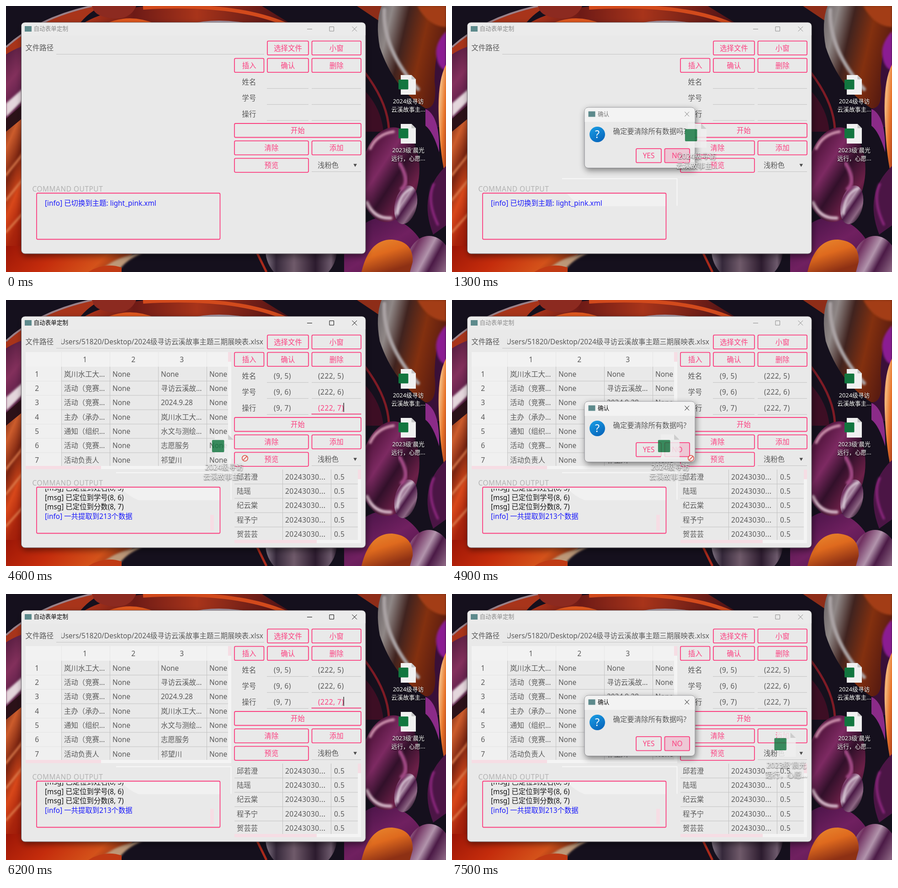
These frames come from a looping animation (963x582 px, 8 s). An HTML page:

```html
<!DOCTYPE html>
<html lang="zh-CN">
<head>
<meta charset="utf-8">
<title>自动表单定制</title>
<style>
html, body { margin: 0; width: 100%; height: 100%; overflow: hidden; background: #15101d; }
svg { display: block; width: 963px; height: 582px; font: 15.4px "Noto Sans", "Noto Sans CJK SC", sans-serif; }
text { fill: #5a5a5a; white-space: pre; }
.mid { text-anchor: middle; }
.num { letter-spacing: .4px; font-size: 15.6px; }
.btn rect { fill: none; stroke: #fb4080; stroke-width: 1.8; }
.btn text { fill: #fb4080; text-anchor: middle; }
.line { stroke: #c3c3c3; fill: none; }
.pink { fill: #f6dde4; }
.track { fill: #f4f4f4; }
.blue { fill: #1b1bfb; }
.black { fill: #161616; }
.icon text { fill: #fff; font-size: 12.8px; text-anchor: middle; filter: drop-shadow(0 1px 1px #000); }
.title { font-size: 12.6px; }
.glow path { fill: none; stroke-linecap: round; filter: url(#soft); }

/* 100 ms = 1.25% */
.title, .ctl, .dtitle, .dctl, .dialog, .ghostA, .ghostB, .hoverA, .hoverB, .data, .empty, .ban, .focus, .blur, .caret, .sheen {
  animation: 8s step-end infinite;
}
.ctl, .dctl { fill: none; stroke: currentColor; }
.title, .dtitle { fill: currentColor; }
.title, .ctl { animation-name: active; }
.dtitle, .dctl { animation-name: dactive; }
.dtitle { font-size: 12.6px; }
.dialog { animation-name: dialog; transform-origin: 411px 288px; }
.ghostA { animation-name: ghostA; }
.ghostB { animation-name: ghostB; }
.hoverA { animation-name: hoverA; }
.hoverB { animation-name: hoverB; }
.data { animation-name: data; }
.empty { animation-name: empty; }
.ban { animation-name: ban; }
.focus { animation-name: focus; }
.blur { animation-name: blur; }
.caret { animation-name: caret; }
.sheen { animation-name: sheen; }

@keyframes active {
  0%, 58.75%, 88.75%, 100% { color: #8b8b8b; }
  23.75%, 76.25% { color: #080808; }
}
@keyframes dactive { 0% { color: #777; } 40%, 100% { color: #080808; } }
@keyframes dialog {
  0%, 25%, 77.5% { opacity: 0; transform: scale(.94); }
  15%, 92.5% { opacity: .5; transform: scale(.96); }
  58.75% { opacity: .35; transform: scale(.94); }
  60% { opacity: .8; transform: scale(.98); }
  16.25%, 61.25%, 93.75%, 100% { opacity: 1; transform: none; }
  22.5%, 75% { opacity: .6; transform: scale(.97); }
  23.75%, 76.25% { opacity: .2; transform: scale(.94); }
}
@keyframes ghostA {
  0% { opacity: 0; transform: translate(880.5px, 151px) scale(1.235); }
  11.25% { opacity: .82; transform: translate(839px, 164px) scale(1.235); }
  12.5% { opacity: .82; transform: translate(726px, 199px) scale(1.235); }
  13.75% { opacity: .82; transform: translate(605px, 236px) scale(1.235); }
  15% { opacity: .82; transform: translate(536.5px, 257px) scale(1.235); }
  57.5% { opacity: .82; transform: translate(477.5px, 294px) scale(1.235); }
  76.25%, 100% { opacity: 0; transform: translate(477.5px, 294px) scale(1.235); }
}
@keyframes ghostB {
  0% { opacity: 0; transform: translate(880.5px, 258px) scale(1.235); }
  88.75% { opacity: .82; transform: translate(858px, 265px) scale(1.235); }
  90% { opacity: .82; transform: translate(788px, 286px) scale(1.235); }
  91.25%, 100% { opacity: .82; transform: translate(732px, 303px) scale(1.235); }
}
@keyframes hoverA { 0%, 12.5%, 100% { opacity: 0; } 8.75% { opacity: 1; } }
@keyframes hoverB { 0%, 90%, 100% { opacity: 0; } 86.25% { opacity: 1; } }
@keyframes data { 0% { opacity: 0; } 57.5%, 100% { opacity: 1; } }
@keyframes empty { 0% { opacity: 1; } 57.5%, 100% { opacity: 0; } }
@keyframes ban { 0%, 76.25%, 100% { opacity: 0; } 57.5% { opacity: 1; } }
@keyframes focus { 0%, 58.75%, 88.75%, 100% { opacity: 0; } 57.5%, 76.25% { opacity: 1; } }
@keyframes blur { 0%, 57.5%, 76.25% { opacity: 0; } 58.75%, 88.75%, 100% { opacity: 1; } }
@keyframes caret { 0%, 58.75%, 82.5%, 100% { opacity: 0; } 57.5%, 76.25% { opacity: 1; } }
@keyframes sheen { 0% { opacity: 0; } 16.25%, 100% { opacity: 1; } }
</style>
</head>
<body>
<svg viewBox="0 0 963 582">
  <defs>
    <linearGradient id="fire" x2="1" y2=".2">
      <stop stop-color="#9c1606"/><stop offset=".4" stop-color="#c42c0c"/><stop offset=".75" stop-color="#d4521a"/><stop offset="1" stop-color="#6a2414"/>
    </linearGradient>
    <linearGradient id="arc" x2="1">
      <stop stop-color="#b8381a"/><stop offset=".25" stop-color="#6d1a16"/><stop offset=".55" stop-color="#a8341a"/><stop offset="1" stop-color="#4b1015"/>
    </linearGradient>
    <linearGradient id="plum" x2=".4" y2="1">
      <stop stop-color="#4a1838"/><stop offset=".45" stop-color="#83305c"/><stop offset=".75" stop-color="#5c1e48"/><stop offset="1" stop-color="#3c1828"/>
    </linearGradient>
    <linearGradient id="side" x2=".3" y2="1">
      <stop stop-color="#6b2412"/><stop offset=".2" stop-color="#cc5c2c"/><stop offset=".4" stop-color="#7c2410"/><stop offset=".6" stop-color="#d8481a"/><stop offset=".8" stop-color="#a8240c"/><stop offset="1" stop-color="#9c1606"/>
    </linearGradient>
    <linearGradient id="steel" x2="1" y2=".35">
      <stop stop-color="#6b6467"/><stop offset=".2" stop-color="#8f8786"/><stop offset=".42" stop-color="#40231f"/><stop offset=".7" stop-color="#83300f"/><stop offset="1" stop-color="#5a1c10"/>
    </linearGradient>
    <linearGradient id="bubble" x2="1" y2=".8">
      <stop stop-color="#b0628c"/><stop offset=".2" stop-color="#561640"/><stop offset=".42" stop-color="#7d2a62"/><stop offset=".62" stop-color="#32102a"/><stop offset=".85" stop-color="#6c2048"/><stop offset="1" stop-color="#3c1230"/>
    </linearGradient>
    <linearGradient id="pearl" x2="1" y2=".7">
      <stop stop-color="#cbb6c6"/><stop offset=".22" stop-color="#703060"/><stop offset=".45" stop-color="#b294ac"/><stop offset=".6" stop-color="#4b1a46"/><stop offset=".85" stop-color="#8d6784"/><stop offset="1" stop-color="#382036"/>
    </linearGradient>
    <linearGradient id="smoke" x2="1">
      <stop stop-color="#857887"/><stop offset=".15" stop-color="#35283a"/><stop offset=".4" stop-color="#6f5a6a"/><stop offset=".7" stop-color="#2c1b2e"/><stop offset=".92" stop-color="#6d5a6c"/><stop offset="1" stop-color="#281a2a"/>
    </linearGradient>
    <linearGradient id="violet" x2="1" y2="1">
      <stop stop-color="#3d1040"/><stop offset=".5" stop-color="#702060"/><stop offset="1" stop-color="#4b1345"/>
    </linearGradient>
    <linearGradient id="egg" x2=".5" y2="1">
      <stop stop-color="#e98a30"/><stop offset=".5" stop-color="#df6a1e"/><stop offset="1" stop-color="#8d3014"/>
    </linearGradient>
    <linearGradient id="amber" y2="1">
      <stop stop-color="#d8561a"/><stop offset=".25" stop-color="#f3b87c"/><stop offset=".6" stop-color="#e8742a"/><stop offset="1" stop-color="#a53a1c"/>
    </linearGradient>
    <linearGradient id="help" x2=".6" y2="1"><stop stop-color="#1ba0e6"/><stop offset="1" stop-color="#0868bd"/></linearGradient>
    <filter id="shadow" x="-20%" y="-20%" width="140%" height="150%"><feDropShadow dy="5" stdDeviation="7" flood-opacity=".45"/></filter>
    <filter id="soft" x="-30%" y="-30%" width="160%" height="160%"><feGaussianBlur stdDeviation="2"/></filter>
    <clipPath id="pathClip"><rect x="121" y="76" width="444" height="30"/></clipPath>
    <clipPath id="gridClip"><rect x="43" y="114" width="443" height="249"/></clipPath>
    <clipPath id="listClip"><rect x="500" y="371" width="270" height="154"/></clipPath>
    <clipPath id="logClip"><rect x="69" y="413" width="398" height="95"/></clipPath>
  </defs>

  <g id="wall">
    <rect width="963" height="582" fill="#15101d"/>
    <path d="M0 92Q70 26 185 0H210Q180 14 160 40L0 130Z" fill="#a8341a"/>
    <path d="M0 90Q70 26 188 0" fill="none" stroke="#9a8088" stroke-width="4"/>
    <path d="M165 40Q240 -6 380 0H560L625 40Z" fill="url(#arc)"/>
    <path d="M300 4Q500 -8 612 40" fill="none" stroke="#d24a1c" stroke-width="8"/>
    <path d="M189 0H285Q270 34 225 26Q190 20 189 0Z" fill="#8c2a20"/>
    <path d="M215 40Q270 14 330 40Z" fill="#e0581e"/>
    <path d="M400 40Q460 24 545 40Z" fill="#a699a8"/>
    <path d="M0 106Q20 92 60 80V250L0 262Z" fill="url(#plum)"/>
    <path d="M0 213L40 178V203L0 243Z" fill="#e4d6dc" filter="url(#soft)"/>
    <path d="M0 247L40 212V250L0 275Z" fill="#2b1118"/>
    <path d="M0 275L45 238V582H0Z" fill="url(#side)"/>
    <g class="glow" stroke="#e08050" stroke-width="4"><path d="M0 370L40 320M0 425L40 375M0 495L40 450"/></g>
    <path d="M0 525H310Q255 550 240 582H0Z" fill="url(#fire)"/>
    <path d="M205 582Q235 548 300 540Q258 557 246 582Z" fill="#bd9878" filter="url(#soft)"/>
    <path d="M180 582Q215 560 253 572V582Z" fill="#c03a14"/>
    <path d="M547 535L570 582" stroke="#a92a1b" stroke-width="5"/>
    <ellipse cx="646" cy="535" rx="78" ry="73" fill="url(#smoke)"/>
    <path d="M768 0H835V45Z" fill="#8e2d18"/>
    <path d="M963 40V265H930Q905 150 880 125Z" fill="#3a1038"/>
    <path d="M822 0H963V60Q938 90 938 165Q945 225 918 224Q848 180 818 90Q808 35 822 0Z" fill="url(#steel)"/>
    <path d="M900 0H963V46Q925 45 900 0Z" fill="#a33d14" filter="url(#soft)"/>
    <path d="M963 55Q935 85 943 115Q948 138 963 140Z" fill="#8b1f92" filter="url(#soft)"/>
    <path d="M963 128Q944 165 947 240Q950 330 963 378Z" fill="url(#amber)"/>
    <path d="M785 145Q838 215 838 275" fill="none" stroke="#7d1b25" stroke-width="5"/>
    <path d="M785 185Q822 225 826 275H785Z" fill="#3d0e24"/>
    <path d="M918 225Q950 240 948 320Q935 275 918 262Z" fill="#8b2b88"/>
    <path d="M963 350Q900 410 935 500L963 480Z" fill="#4b1545"/>
    <path d="M740 582V530Q790 440 860 470Q920 500 930 582Z" fill="url(#violet)"/>
    <ellipse cx="840" cy="369" rx="64" ry="104" transform="rotate(7 840 369)" fill="url(#bubble)"/>
    <ellipse cx="875" cy="435" rx="24" ry="43" transform="rotate(13 875 435)" fill="url(#pearl)"/>
    <ellipse cx="926" cy="568" rx="50" ry="65" fill="url(#pearl)"/>
    <path d="M778 582Q795 510 845 511Q892 515 890 560L884 582Z" fill="url(#egg)"/>
    <g class="glow">
      <path d="M828 8Q824 95 902 182" stroke="#aaa3a4" stroke-width="8"/>
      <path d="M936 390Q920 425 945 478" stroke="#8e2880" stroke-width="5"/>
      <path d="M797 312Q812 280 848 275" stroke="#d094b0" stroke-width="6"/>
      <path d="M790 430Q806 466 842 464" stroke="#d2b4c4" stroke-width="7"/>
      <path d="M857 455Q858 412 888 399" stroke="#e4d8e2" stroke-width="4"/>
      <path d="M862 345Q885 385 866 400" stroke="#a04a84" stroke-width="8"/>
    </g>
  </g>
  <g id="desk"></g>
  <g id="app"></g>
  <g id="top"></g>
</svg>
<script>
const PINK = '#fb4080';
const put = (id, ...parts) => { document.getElementById(id).innerHTML = parts.flat(3).join(''); };
const text = (x, y, s, cls = '') => `<text x="${x}" y="${y}" class="${cls}">${s}</text>`;
const rect = (x, y, w, h, attr = '') => `<rect x="${x}" y="${y}" width="${w}" height="${h}" ${attr}/>`;
const path = (d, cls = 'line', attr = '') => `<path d="${d}" class="${cls}" ${attr}/>`;
const group = (cls, ...parts) => `<g class="${cls}">${parts.flat(3).join('')}</g>`;
const clip = (id, ...parts) => `<g clip-path="url(#${id})">${parts.flat(3).join('')}</g>`;
const button = (x, y, w, s) => group('btn', rect(x, y, w, 30.5, 'rx="2.5"'), text(x + w / 2, y + 20.9, s));
const badge = (x, y) => rect(x, y, 15, 12, 'fill="#5d8a8c"');

const icon = lines => group('icon',
  path('M-16.5 0H7L16.5 9.5V43H-16.5Z', '', 'fill="#f0f0f0"'),
  path('M7 0V9.5H16.5Z', '', 'fill="#c6c6c6"'),
  rect(-21.5, 10, 21.5, 21.5, 'rx="1.5" fill="#12763f"'),
  lines.map((s, i) => text(0, 62 + i * 17.5, s)));
const place = (x, y, s) => `<g transform="translate(${x} ${y})">${s}</g>`;
const hover = (cls, y) => rect(841.5, y, 78, 89, `rx="4" class="${cls}" fill="#fff" fill-opacity=".14" stroke="#fff" stroke-opacity=".18"`);

const fileA = icon(['2024级寻访', '云溪故事主...']);
const fileB = icon(["2023级'晨光", '远行，心愿...']);

put('desk',
  hover('hoverA', 145.5), hover('hoverB', 253.5),
  place(880.5, 151, fileA), place(880.5, 258, fileB));

// Spreadsheet
const ROW = 31.35;
const cells = [
  ['岚川水工大...', 'None', 'None'],
  ['活动（竞赛...', 'None', '寻访云溪故...'],
  ['活动（竞赛...', 'None', '2024.9.28'],
  ['主办（承办...', 'None', '岚川水工大...'],
  ['通知（组织...', 'None', '水文与测绘...'],
  ['活动（竞赛...', 'None', '志愿服务'],
  ['活动负责人', 'None', '祁望川']
];
const sheet = [
  clip('gridClip',
    rect(43, 114, 443, 32, 'fill="#f2f2f2"'), rect(43, 146, 78, 217, 'fill="#f0f0f0"'),
    [1, 2, 3].map(n => text(67 + n * 106, 135.6, n, 'mid num')),
    cells.map((row, r) => {
      const y = 146 + r * ROW;
      return [
        path(`M121 ${y + ROW}H486`), text(68, y + 21.5, r + 1, 'mid num'),
        [...row, 'None'].map((s, c) => text(127 + c * 106, y + 21.5, s))
      ];
    }),
    path('M121.5 146V363M227.5 146V363M333.5 146V363M439.5 146V363'),
    path('M121.5 114V146M227.5 114V146M333.5 114V146M439.5 114V146M43 177.5H121M43 208.5H121M43 240H121M43 271.5H121M43 302.5H121M43 334H121', 'line', 'stroke-opacity=".25"')),
  rect(486, 114, 7, 256, 'class="track"'), rect(43, 363, 443, 7, 'class="track"'),
  rect(486, 114, 7, 21, 'class="pink"'), rect(43, 363, 165, 7, 'class="pink"')
];

// Extracted list
const people = ['邱若澄', '陆瑶', '纪云棠', '程予宁', '贺芸芸'];
const list = [
  clip('listClip',
    people.map((s, i) => {
      const y = 392.6 + i * ROW;
      return [
        text(505, y, s), text(611, y, '20243030...', 'num'), text(718, y, '0.5', 'num'),
        path(`M500 ${y + 10}H770`)
      ];
    }),
    path('M605.5 371V525M711.5 371V525')),
  rect(770, 371, 7, 154, 'class="track"'), rect(500, 525, 277, 7, 'class="track"'),
  rect(770, 371, 7, 21, 'class="pink"'), rect(500, 525, 180, 7, 'class="pink"')
];

const log = clip('logClip',
  ['姓名(8, 5)', '学号(8, 6)', '分数(8, 7)'].map((s, i) => text(85, 417.4 + i * 20.5, '[msg] 已定位到' + s, 'black')),
  text(85, 478.6, '[info] 一共提取到213个数据', 'blue'),
  rect(447, 470, 8, 34, 'class="pink"'));

const fields = ['姓名', '学号', '操行'].map((s, i) => {
  const y = 172.4 + i * 35;
  return [text(516.5, y, s), path(`M571 ${y + 8}H662M669 ${y + 8}H777`)];
});
const values = [5, 6, 7].map((n, i) => {
  const y = 171.8 + i * 35;
  return [
    text(586, y, `(9, ${n})`, 'num'),
    n < 7 ? text(683, y, `(222, ${n})`, 'num') : group('blur', text(683, y, '(222, 7)', 'num'))
  ];
});

put('app',
  rect(33.5, 36, 753.5, 506, 'rx="8" fill="#e9e9e9" stroke="#68646a" filter="url(#shadow)"'),
  path('M34 64V44Q34 36.5 42 36.5H779Q786.5 36.5 786.5 44V64Z', '', 'fill="#ebebeb"'),
  badge(41, 44), text(60.5, 54.4, '自动表单定制', 'title'),
  path('M659 50.5H670M708 45.5H717.5V55H708ZM757.5 45L768 55.5M768 45L757.5 55.5', 'ctl'),
  text(42.5, 97.2, '文件路径'), path('M110 105.5H565'),
  button(572, 76.7, 90, '选择文件'), button(669.5, 76.7, 107.5, '小窗'),
  button(500, 114.7, 64.5, '插入'), button(572, 114.7, 90, '确认'), button(669.5, 114.7, 107.5, '删除'),
  fields,
  button(500, 257, 277, '开始'),
  button(500, 295.2, 162, '清除'), button(669.5, 295.2, 107.5, '添加'),
  button(500, 333.3, 162, '预览'),
  text(682, 353.6, '浅粉色'), path('M760.5 345.5H768L764.2 352Z', '', 'fill="#4a4a4a"'), path('M669 362.5H777'),
  `<text x="57.5" y="405.8" style="fill:#b2b2b2;letter-spacing:.55px">COMMAND OUTPUT</text>`,
  group('sheen',
    path('M241 377.8H492.5V437', '', 'fill="none" stroke="#f8f8f8" stroke-width="2"'),
    path('M252 411H468V438H290Q268 430 252 411Z', '', 'fill="#f1f1f1"')),
  rect(67, 409.5, 401.5, 101, `rx="2.5" fill="none" stroke="${PINK}" stroke-width="1.8"`),
  group('empty', text(85, 436.8, '[info] 已切换到主题: light_pink.xml', 'blue')),
  group('data',
    clip('pathClip', '<text x="563" y="97" text-anchor="end">C:/Users/51820/Desktop/2024级寻访云溪故事主题三期展映表.xlsx</text>'),
    sheet, list, log, values),
  group('focus',
    `<text x="683" y="241.8" class="num" style="fill:${PINK}">(222, 7)</text>`,
    rect(668.5, 248.6, 109, 1.8, `fill="${PINK}"`)),
  rect(738.5, 225, 1.3, 20, 'class="caret" fill="#111"'));

put('top',
  group('dialog',
    rect(290, 222, 242, 132.5, 'rx="8" fill="#e9e9e9" stroke="#85858a" filter="url(#shadow)"'),
    path('M290.5 253.5V230Q290.5 222.5 298 222.5H524Q531.5 222.5 531.5 230V253.5Z', '', 'fill="#f3f3f3"'),
    badge(298.5, 230.5), text(319, 241, '确认', 'dtitle'),
    path('M509.5 231.5L519 241.5M519 231.5L509.5 241.5', 'dctl'),
    '<circle cx="318" cy="281" r="17" fill="url(#help)"/>',
    '<text x="318" y="289.3" class="mid" style="fill:#fff;font-size:23px">?</text>',
    text(352.5, 280, '确定要清除所有数据吗?'),
    button(403, 312.2, 55, 'YES'),
    rect(465.5, 312.2, 54.5, 30.5, `rx="2.5" fill="${PINK}" fill-opacity=".2"`),
    button(465.5, 312.2, 54.5, 'NO')),
  group('ghostA', fileA), group('ghostB', fileB),
  group('ban',
    '<circle cx="523" cy="346.3" r="6.3" fill="#f6e9e7" stroke="#dc5148" stroke-width="1.6"/>',
    path('M518.6 350.7L527.4 341.9', '', 'stroke="#dc5148" stroke-width="1.6"')));
</script>
</body>
</html>
```
